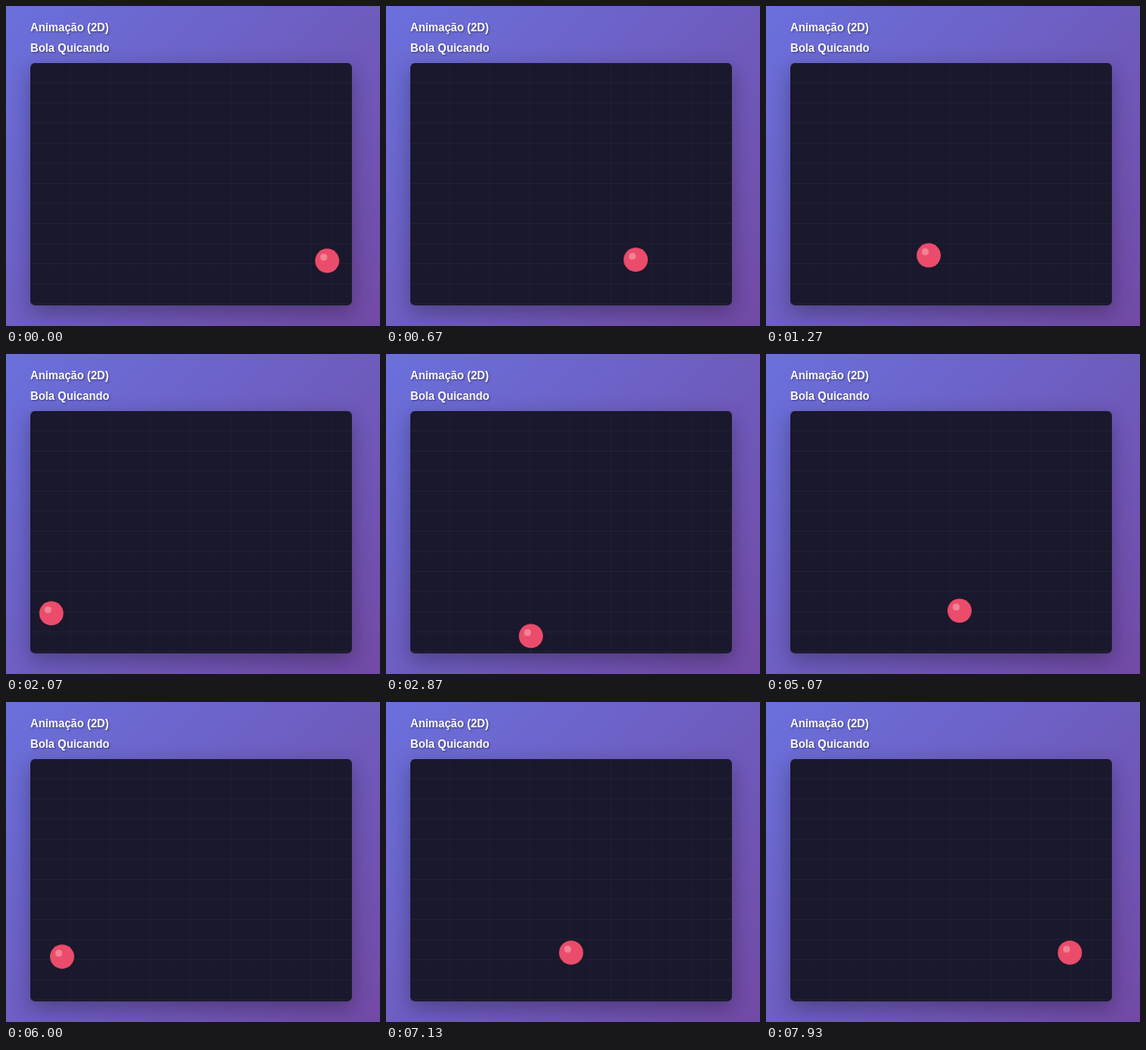
Animation, 400 px wide and 342 px high, one loop 8000 ms. Source, as an HTML page:

```html
<!DOCTYPE html>
<html lang="pt">
<head>
<meta charset="utf-8">
<title>Bola Quicando</title>
<style>
  html, body { margin: 0; width: 100%; height: 100%; overflow: hidden; }
  body { position: relative; background: linear-gradient(135deg, #6a70dc, #724aa5); }
  h1, h2 {
    position: absolute; left: 26px; margin: 0;
    font: bold 12px/14px "Liberation Sans", Arial, sans-serif;
    color: #fff; white-space: nowrap;
    text-shadow: 1px 1px 2px rgba(0, 0, 0, .4);
  }
  h1 { top: 16px; }
  h2 { top: 38px; }
  #panel {
    position: absolute; left: 26px; top: 61px; width: 344px; height: 258.5px;
    border-radius: 5px; background: #1a182c;
    box-shadow: 0 7px 22px rgba(0, 0, 0, .3);
  }
  svg { position: absolute; left: 0; top: 0; }
</style>
</head>
<body>
<h1>Animação (2D)</h1>
<h2>Bola Quicando</h2>
<div id="panel"></div>
<svg width="400" height="342">
  <defs>
    <pattern id="grid" x="26" y="61" width="21.5" height="21.5" patternUnits="userSpaceOnUse">
      <path d="M0 21H21.5" stroke="#fff" stroke-opacity=".035"/>
      <path d="M21 0V21.5" stroke="#fff" stroke-opacity=".012"/>
    </pattern>
  </defs>
  <rect x="26" y="61" width="344" height="258.5" rx="5" fill="url(#grid)"/>
  <g id="ball">
    <circle r="12.9" fill="#eb4c6b"/>
    <circle cx="-3.6" cy="-3.8" r="3.7" fill="#fff" fill-opacity=".3"/>
  </g>
</svg>
<script>
  const LOOP = 8000, STEPS_PER_10MS = 0.15;
  const LEFT = 39, SPAN = 318;           // horizontal range of the ball's centre
  const APEX = 266, FLOOR = 306.6;       // vertical range
  const BOUNCE = 105.17, START = 304.5;  // travel per bounce, travel at the loop start
  // [step, horizontal distance travelled, not folded at the walls]
  const travelKeys = [[0, START], [19, 501], [43, 752], [62, 957], [90, 1251], [107, 1431], [119, 1558]];
  const ball = document.getElementById('ball');

  function travelAt(step) {
    const i = Math.max(1, travelKeys.findIndex(key => key[0] >= step));
    const [s0, d0] = travelKeys[i - 1], [s1, d1] = travelKeys[i];
    return d0 + (d1 - d0) * (step - s0) / (s1 - s0);
  }

  function draw(now) {
    const time = now % LOOP;
    const step = Math.min(119, Math.floor((Math.floor(time / 10) + 0.5) * STEPS_PER_10MS));
    const travel = travelAt(step);
    const x = LEFT + SPAN - Math.abs(travel % (2 * SPAN) - SPAN);
    const turns = (travel - START) / BOUNCE + 0.185;
    const phase = turns - Math.round(turns);
    const y = Math.min(FLOOR, APEX + 183 * phase * phase);
    ball.setAttribute('transform', `translate(${x.toFixed(2)} ${y.toFixed(2)})`);
  }

  let start;
  function tick(now) {
    start ??= now;
    draw(now - start);
    requestAnimationFrame(tick);
  }
  draw(0);
  requestAnimationFrame(tick);
</script>
</body>
</html>
```
